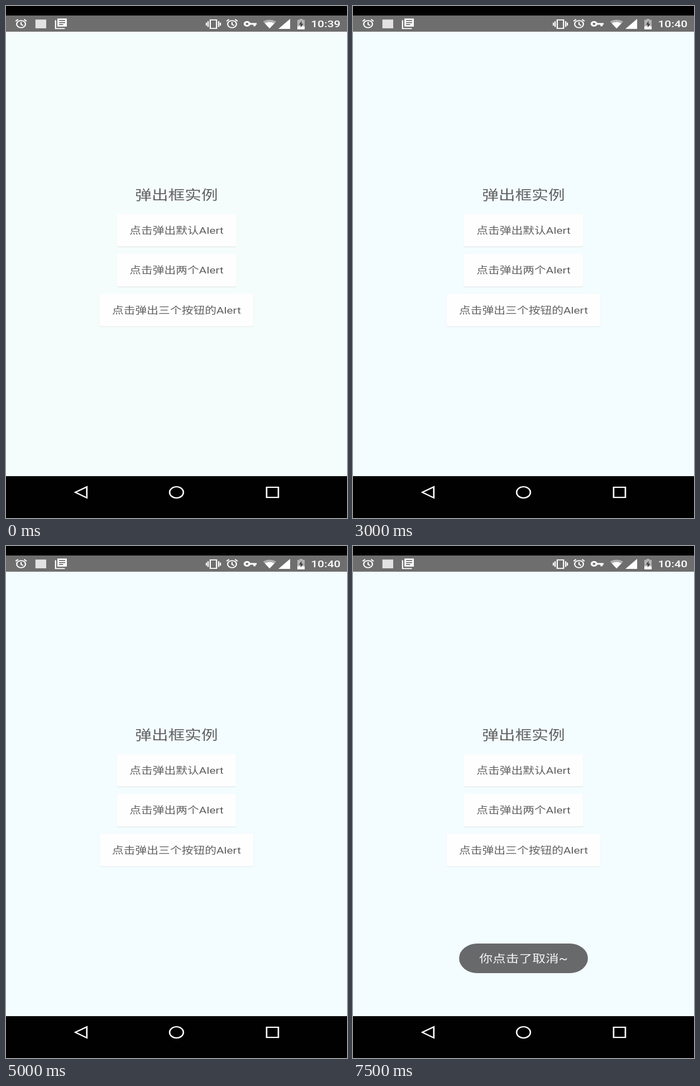
An HTML page that plays this animation: 611x917 px, repeating every 8 s.

```html
<!DOCTYPE html>
<html lang="zh-CN">
<head>
<meta charset="utf-8">
<style>
html, body { margin: 0; width: 100%; height: 100%; overflow: hidden; background: #000 }
svg { display: block; width: 611px; height: 917px }
text { font-family: Roboto, "Noto Sans CJK SC", "Noto Sans CJK", sans-serif }
.mid { text-anchor: middle }
.icon { fill: none; stroke: #fff; stroke-width: 1.5 }
#panel { filter: drop-shadow(0 7px 7px rgba(0,0,0,.5)) }
</style>
</head>
<body>
<svg viewBox="0 0 611 917">
  <rect width="611" height="917" fill="#020101"/>
  <!-- dp units of the phone screen -->
  <g transform="translate(0 17) scale(1.4852 1.2085)">
    <rect id="page" y="24" width="411.4" height="658.7"/>
    <rect width="411.4" height="24" fill="#6e6e6e"/>
    <g id="content" fill="#616161" class="mid">
      <text x="205.7" y="265.6" dy=".38em" font-size="20">弹出框实例</text>
    </g>
    <rect id="dim" width="411.4" height="682.7"/>

    <g id="status">
      <defs>
        <g id="alarm" class="icon">
          <circle r="5.3"/>
          <path d="M0-3V.5L2.5 2M-6.6-4.3L-3.6-7M6.6-4.3L3.6-7"/>
        </g>
      </defs>
      <use href="#alarm" x="18.2" y="12.8"/>
      <use href="#alarm" x="272.7" y="12.8"/>
      <rect x="35.5" y="6" width="13" height="13" fill="#e2e2e2"/>
      <path d="M62 4.5H73.4V16.5H62Z" fill="#fff"/>
      <path d="M59.8 7V19.4H71" class="icon"/>
      <path d="M64 7.5H71.4M64 10.5H71.4M64 13.5H69" stroke="#555" stroke-width="1.2"/>
      <path d="M246.4 6.5H254V19.2H246.4ZM241.8 10.5V15M243.8 8.5V17M256.6 8.5V17M258.6 10.5V15" class="icon"/>
      <g class="icon" stroke-width="2.5">
        <circle cx="290.8" cy="12.4" r="2.9" style="stroke-width:2.4"/>
        <path d="M294 12.4H302.4M299.8 12.4V16" style="stroke-width:2.6"/>
      </g>
      <path d="M310 8.8Q318 3.5 326 8.8L318 19.3Z" fill="#fff" opacity=".45"/>
      <path d="M312.2 11.6Q318 8 323.8 11.6L318 19.3Z" fill="#fff"/>
      <path d="M328.6 19.8H342.8V5Z" fill="#fff"/>
      <path d="M351.5 6.5H354.2V5H357.6V6.5H360.3V20.5H351.5Z" fill="#b4b4b4"/>
      <path d="M351.5 16H360.3V20.5H351.5Z" fill="#fff"/>
      <path d="M356.6 8L353.4 13.6H355.5V17.8L358.6 12.2H356.6Z" fill="#444"/>
      <text id="clock" x="368" y="12.4" dy=".355em" font-size="14" font-weight="500" fill="#fff"></text>
    </g>

    <g id="dialog">
      <rect id="panel" x="26.3" y="274.9" width="358.4" height="156.2" rx="2" fill="#fff"/>
      <g fill="#1c1c1c">
        <text id="heading" x="51" y="307" dy=".38em" font-size="20"></text>
        <text id="message" x="51" y="339.3" dy=".38em" font-size="16"></text>
      </g>
      <g fill="#00807c" font-size="14" font-weight="500">
        <text id="cancel" x="263" y="403.8" dy=".38em"></text>
        <text id="confirm" y="403.8" dy=".37em"></text>
      </g>
    </g>

    <g id="toast">
      <rect id="pill" x="128" y="575.1" width="155.4" height="43.8" rx="21.9"/>
      <text id="note" class="mid" x="205.7" y="597.4" dy=".38em" font-size="16" fill="#f6f6f6"></text>
    </g>

    <g class="icon" style="stroke-width:1.8">
      <path d="M83.6 706.7L97.5 698.6V714.8Z"/>
      <circle cx="205.7" cy="706.7" r="8.3"/>
      <rect x="314.4" y="699.2" width="14.2" height="15"/>
    </g>
  </g>
</svg>
<script>
const el = id => document.getElementById(id);

function addButton(label, y, width) {
  const x = 205.7 - width / 2;
  el('content').insertAdjacentHTML('beforeend',
    `<rect x="${x}" y="${y - 23.6}" width="${width}" height="48.8" rx="2" fill="#dfe3e4"/>
     <rect x="${x}" y="${y - 24}" width="${width}" height="48.4" rx="2" fill="#fefefe"/>
     <text x="205.7" y="${y}" dy=".38em" font-size="14">${label}</text>`);
}
addButton('点击弹出默认Alert', 317.9, 144.4);
addButton('点击弹出两个Alert', 377.3, 144.4);
addButton('点击弹出三个按钮的Alert', 436.2, 185.4);

const single = { heading: '温馨提醒', message: '确定退出吗?', cancel: '', confirm: 'OK', x: 331.6 };
const pair = { heading: '温馨提示', message: '确认退出?', cancel: '取消', confirm: '确定', x: 327 };
const confirmed = '你点击了确定~', cancelled = '你点击了取消~';

// start time, dialog, dialog opacity, toast
const steps = [
  [0], [2000, single, .6], [2500, single, 1], [3000],
  [4000, pair, .6], [4500, pair, 1], [5000], [5500, null, 0, confirmed],
  [6000, pair, 1, confirmed], [7000, pair, .4, confirmed], [7500, null, 0, cancelled]
];

function render(t) {
  const [, dialog, shown = 0, toast] = steps.findLast(s => s[0] <= t);
  el('clock').textContent = t < 1500 ? '10:39' : '10:40';
  el('page').setAttribute('fill', t < 3000 ? '#f5fdfc' : '#f3fcff');
  el('dim').setAttribute('opacity', .625 * shown);
  el('dialog').setAttribute('opacity', shown);
  if (dialog) {
    for (const id of ['heading', 'message', 'cancel', 'confirm']) el(id).textContent = dialog[id];
    el('confirm').setAttribute('x', dialog.x);
  }
  el('toast').setAttribute('opacity', toast ? 1 : 0);
  el('pill').setAttribute('fill', shown ? '#4d4d4d' : '#68696b');
  el('note').textContent = toast || '';
}

function tick() {
  render(performance.now() % 8000);
  requestAnimationFrame(tick);
}
tick();
</script>
</body>
</html>
```
